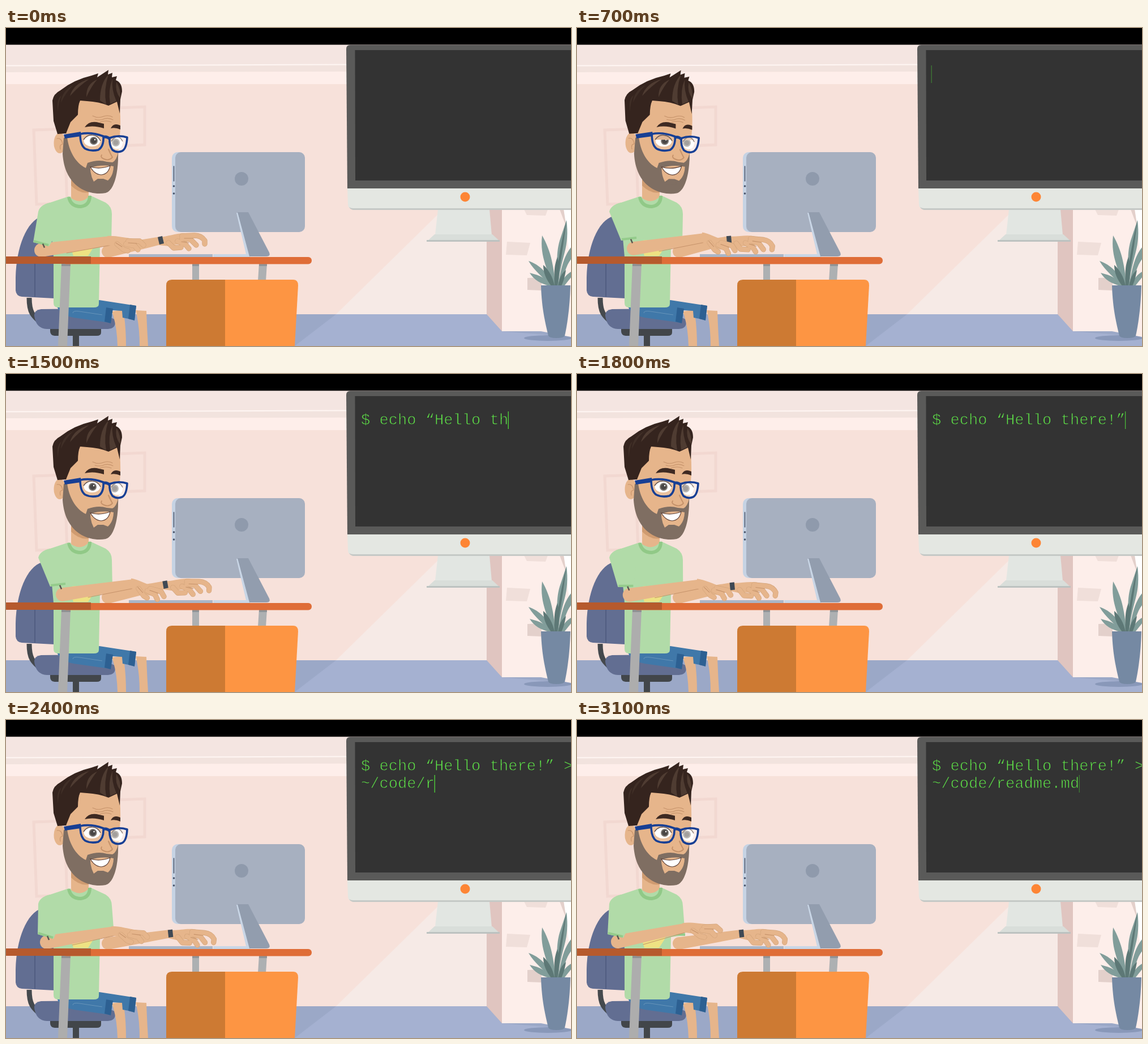
Recreate the animation shown at these times as an HTML page. Size 998 by 561 pixels, loop 3200 ms.

```html
<!DOCTYPE html>
<html lang="en">
<head>
<meta charset="utf-8">
<title>Typing at the desk</title>
<style>
  html, body { margin: 0; width: 100%; height: 100%; overflow: hidden; background: #000; }
  svg { display: block; width: 100vw; height: 100vh; }
  text { font: 27.1px "Liberation Mono", monospace; fill: #5fe348; stroke: #333; stroke-width: .8; white-space: pre; }
  .skin { fill: #e6b58b; }
  .crease { fill: none; stroke: #c6936b; stroke-width: 1.1; stroke-linecap: round; stroke-linejoin: round; }
  .finger { fill: none; stroke: #e6b58b; stroke-width: 8; stroke-linecap: round; stroke-linejoin: round; }
  .edge { stroke: #d3a47a; stroke-width: 9.4; }
  .shirt { fill: #b1dba8; }
  .hem { fill: none; stroke: #94cb8b; stroke-width: 4; }
  .chair { fill: #626e92; }
  .hair { fill: #35241e; }
  .strand { fill: #4f3c32; }
  .frame { fill: #fff; fill-opacity: .16; stroke: #173f94; stroke-width: 3.6; stroke-linejoin: round; }
</style>
</head>
<body>
<svg viewBox="0 0 998 561">
  <defs>
    <clipPath id="eyes"><ellipse cx="152" cy="199" rx="14.500" ry="10"/><ellipse cx="196" cy="203" rx="10" ry="10.500"/></clipPath>
  </defs>

  <g id="room">
    <path fill="#f7e1da" d="M0 29H998V561H0Z"/>
    <path fill="#f4e5e1" d="M0 29H998V64L0 66Z"/>
    <path fill="#f2e3de" d="M0 66L998 64V76L0 78Z"/>
    <path fill="none" stroke="#fff6f3" stroke-width="2" d="M0 66.500L610 64.500"/>
    <path fill="#feeeea" d="M0 78L998 76V99H0Z"/>
    <g fill="none" stroke="#f2d8d1" stroke-width="5">
      <path d="M49 180L103 178L108 309L54 311Z"/>
      <path d="M170 142L245 139V206L174 209Z"/>
    </g>
    <path fill="#9ba8c7" d="M0 505H998V561H0Z"/>
    <path fill="#f6eae6" d="M772 320H850V505H583Z"/>
    <path fill="#a5b1d1" d="M583 505H850L876 535L998 545V561H510Z"/>
    <path fill="#e0c5c0" d="M849 320H876V535L849 505Z"/>
    <path fill="#fdeeea" d="M876 320H998V545L945 535H876Z"/>
    <path fill="#fff" d="M985 320H998V420Z"/>
    <path fill="#e3d0cb" d="M978 320H985L990 352Z"/>
    <path fill="#f0dfda" d="M915 320H957L953 331L920 330ZM885 377L926 379L920 401L883 400Z"/>
    <path fill="#e3d0cb" d="M921 441L946 440V463L921 462Z"/>
    <ellipse cx="957" cy="547" rx="42" ry="5" fill="#8998b9"/>
    <g fill="#819d9a">
      <path d="M964 455C960 430 942 405 947 366C954 378 961 395 964 410C968 428 969 440 970 455Z"/>
      <path d="M970 455C976 425 970 402 978 375L990 339C993 362 991 380 987 395C982 415 977 430 976 455Z"/>
      <path d="M962 455C950 440 934 430 923 411C942 417 958 433 967 455Z"/>
      <path d="M975 455C980 428 984 404 998 387V408C989 419 985 438 980 455Z"/>
      <path d="M960 455C945 451 933 445 925 432C943 436 956 443 966 455Z"/>
      <path d="M978 455C984 441 991 434 998 430V440L986 455Z"/>
    </g>
    <path fill="#5d7876" d="M963 455C954 443 949 432 949 418C960 428 966 440 969 455ZM969 455C968 432 968 420 974 404C979 422 977 440 974 455ZM970 455C974 420 979 385 990 339C984 390 977 425 974 455ZM975 455C978 440 982 432 989 427C987 440 984 449 981 455Z"/>
    <path fill="#7589a3" d="M945 454H997C996 490 992 520 987 543Q985 547 972 547Q960 547 958 543C951 515 946 490 945 454Z"/>
  </g>

  <g id="terminal">
    <path fill="#e2e6e2" d="M763 320H854L858 365H758Z"/>
    <path fill="#d9deda" d="M757 364H859L872 376H744Z"/>
    <path fill="#bcc2c0" d="M743 374H872V377H743Z"/>
    <path fill="#5a5a59" d="M601 37Q601 30 608 30H998V284H603Z"/>
    <path fill="#333" d="M616.500 39H998V269H617Z"/>
    <path fill="#e4e7e2" d="M603 283H998V320H613Q604 319 604 311Z"/>
    <path fill="#c5c9c6" d="M606 316Q609 318 613 318H998V321H613Q608 320 606 316Z"/>
    <circle cx="811" cy="298" r="8.500" fill="#fd8535"/>
    <text id="line0" x="627" y="89" xml:space="preserve"></text>
    <text id="line1" x="627" y="120" xml:space="preserve"></text>
    <rect id="cursor" width="1.300" height="31" fill="#4fd83a"/>
  </g>

  <g id="computer">
    <rect x="293" y="219" width="60" height="141" rx="10" fill="#c6d3e4"/>
    <rect x="299" y="219" width="229" height="141" rx="10" fill="#a7b0c0"/>
    <path stroke="#48536a" stroke-width="1.600" stroke-linecap="round" d="M296.500 244V270"/>
    <circle cx="296.500" cy="279" r="1.800" fill="#48536a"/><circle cx="296.500" cy="292" r="1.800" fill="#48536a"/>
    <circle cx="416" cy="266" r="12" fill="#8f9aac"/>
    <path fill="#c9d6e6" d="M407 326H415L431 404H366V399H424Z"/>
    <path fill="#929dae" d="M409 325H428L465 396Q468 403 460 403H430Z"/>
    <path fill="#aab6c7" d="M217 399H365V404H217Z"/>
  </g>

  <g id="seat">
    <path class="chair" d="M64 332C36 340 18 388 17 440V463Q18 473 28 474L86 477V332Z"/>
    <path fill="none" stroke="#4c587c" stroke-width="1.500" d="M51 414V474"/>
    <path fill="none" stroke="#45494d" stroke-width="9" d="M41 476C41 503 48 508 62 520"/>
    <path fill="#42464a" d="M78 531H168V537Q168 543 160 543H86Q78 542 78 535ZM118 542H129V561H118Z"/>
    <path class="chair" d="M50 508Q49 498 62 496L150 495L192 514Q196 530 180 531H72Q53 530 50 508Z"/>
    <path class="skin" d="M187 500L207 497Q212 525 212 561H197Q196 525 187 500ZM229 498L248 499Q249 530 251 561H236Q236 525 229 498Z"/>
    <path fill="#4078a9" d="M90 491L165 480L230 490L227 515L206 511L205 499L187 498L184 520L120 511Q95 506 90 491Z"/>
    <path fill="#2d6092" d="M177 493L189 495L185 521L174 518ZM219 488L230 490L227 516L216 513Z"/>
    <path fill="none" stroke="#6795ba" d="M118 503Q118 498 130 500L170 506"/>
  </g>

  <g id="person">
    <path class="skin" d="M115 270H146V303Q130 313 115 304Z"/>
    <path fill="#cf9b70" d="M115 278Q130 293 146 290V280L115 266Z"/>
    <path id="torso" class="shirt"/>
    <path fill="none" stroke="#91c987" stroke-width="6" d="M111 298Q114 315 132 315Q148 313 148 296"/>
    <path id="print" fill="#eee283" d="M111 377Q125 370 134 379Q146 369 161 374L154 388L145 402H119Z"/>
    <path id="rightHem" class="hem"/>
    <path id="farArm" class="skin"/>
    <g id="farHand">
      <path class="skin" d="M-4 -6C15 -7 25 -13 42 -13Q54 -12 55 -5L43 6L28 7L16 10L-4 8Z"/>
      <path class="finger edge" d="M38 -8L60 -9Q72 -9 78 0V6M38 -4L53 -2L63 8M30 1L44 7L50 14M14 4L23 13L36 12"/>
      <path class="finger" d="M38 -8L60 -9Q72 -9 78 0V6M38 -4L53 -2L63 8M30 1L44 7L50 14M14 4L23 13L36 12"/>
      <path class="crease" d="M42 -4L57 -4M37 2L50 4"/>
      <path fill="#3f4954" d="M-5 -6L3 -8L6 5L-2 7Z"/>
    </g>
    <path id="nearArm" class="skin"/>
    <path id="nearLine" class="crease"/>
    <g id="nearHand">
      <path class="skin" d="M-7 -8C8 -9 22 -5 40 -3L46 7L32 13L16 12L-7 8Z"/>
      <path class="finger edge" d="M30 1L50 1L57 8M26 6L41 9L47 16M10 6L22 16L29 18"/>
      <path class="finger" d="M30 1L50 1L57 8M26 6L41 9L47 16M10 6L22 16L29 18"/>
      <path class="crease" d="M30 4L45 5M8 4L19 11"/>
    </g>
    <path id="sleeve" class="shirt"/>
    <path id="sleeveHem" class="hem"/>
    <path id="ink" stroke="#5a5650" stroke-width="2.500" d="M0 0L3 7"/>

    <g id="head">
      <ellipse class="skin" cx="95" cy="203" rx="10.500" ry="18"/>
      <path class="crease" d="M90 195Q98 193 100 205Q94 205 96 214"/>
      <path class="skin" d="M106 165L126 122H199Q204 160 201 190L197 239Q190 283 165 290Q120 283 104 225Z"/>
      <path fill="#7f6e62" d="M102 194L108 193C111 216 122 238 141 247L144 238Q163 231 178 236L188 237Q195 234 198 220C199 251 192 287 176 291C150 296 104 284 100 222Z"/>
      <path class="skin" d="M149 247Q167 240 190 244Q190 260 180 269L172 266H162L155 271Q149 260 149 247Z"/>
      <path fill="#7f6e62" d="M162 267H173L176 276H155Z"/>
      <path fill="#fff" stroke="#5f4137" stroke-width="1.200" d="M149 245Q166 250 184 243Q181 258 168 259Q156 258 149 245Z"/>
      <path class="crease" d="M153 155Q163 160 172 156Q181 153 188 157M157 161Q167 164 174 160Q182 158 189 162M166 166Q177 162 186 166"/>
      <path class="crease" style="stroke-width:2" d="M181 214Q185 223 188 228Q182 235 173 231Q166 228 169 224"/>
      <path fill="#3e2a22" d="M139 175Q146 164 160 166L173 169V177Q155 171 139 175ZM185 177Q190 166 202 172V179Q193 175 185 177Z"/>
      <g clip-path="url(#eyes)">
        <path fill="#fff" d="M130 180H215V220H130Z"/>
        <g id="pupils">
          <circle cx="153" cy="199" r="7" fill="#625c57"/><circle cx="153" cy="199" r="5" fill="#262321"/>
          <circle cx="192" cy="202" r="7" fill="#908a84"/><circle cx="192" cy="202" r="4.500" fill="#65605b"/>
          <circle cx="155" cy="197" r="1.200" fill="#fff"/>
        </g>
        <rect id="lids" x="130" y="175" width="85" height="24" fill="#d9a77e"/>
      </g>
      <path fill="none" stroke="#4b362c" stroke-width="1.500" d="M137 197Q143 188 152 189Q162 189 167 199M186 200Q191 192 197 192Q203 193 206 200"/>
      <path fill="#173f94" d="M102 188L132 183V191L104 195Z"/>
      <path class="frame" d="M131 187Q150 183 172 191Q173 209 163 215Q150 218 140 213Q131 207 131 187Z"/>
      <path class="frame" style="fill-opacity:.4" d="M183 194Q198 188 214 193Q213 213 205 217Q196 221 188 215Q182 207 183 194Z"/>
      <path fill="none" stroke="#173f94" stroke-width="5" d="M171 193Q177 190 184 196"/>
      <path class="hair" d="M91 187L84 164L82 128Q84 116 96 110Q120 91 151 84L163 80L161 87L181 74L180 82L188 79L187 87L196 85L194 92Q205 96 205 112L202 126L201 151L196 130L181 137Q164 130 143 129L131 128Q127 136 127 153L114 166L106 186Z"/>
      <path class="strand" d="M181 82Q166 98 166 128L177 135Q172 109 181 82ZM188 90Q180 109 184 134L195 129Q186 109 188 90ZM195 95Q192 112 202 124Q203 108 195 95ZM161 91Q141 99 142 122Q151 102 161 91ZM147 90Q119 98 113 120Q129 102 147 90Z"/>
      <path class="strand" opacity=".45" d="M119 101Q98 111 97 132Q106 113 119 101ZM98 119Q88 126 92 148Q92 132 98 119Z"/>
    </g>
  </g>

  <g id="desk">
    <path fill="#adb0b2" d="M329 415H341V446H329ZM447 415H461L459 446H445Z"/>
    <path fill="#909498" d="M329 415H341V420H329ZM447 415H461V420H447Z"/>
    <path fill="#cd7a33" d="M283 454Q283 444 293 444H388V561H283Z"/>
    <path fill="#fd9543" d="M387 444H507Q516 444 516 454L510 561H387Z"/>
    <path fill="#adadad" d="M98 415H114L108 561H92Z"/>
    <path fill="#8f9193" d="M98 415H114V420H98Z"/>
    <rect x="100" y="404" width="440" height="12.500" rx="6" fill="#df6d37"/>
    <path fill="#b65a2d" d="M0 403H150V416H0Z"/>
  </g>
  <path d="M0 0H998V29.500H0Z"/>
</svg>

<script>
const LOOP = 3200, STEP = 100, ADVANCE = 16.26;
const LINES = ['$ echo “Hello there!” >', '~/code/readme.md'];
const el = id => document.getElementById(id);
const put = (id, name, value) => el(id).setAttribute(name, value);
const clamp = (v, lo, hi) => Math.min(hi, Math.max(lo, v));

// elbow xy, wrist xy, near turn, near scale, far wrist xy, far turn, sleeve x, hem ys, right side x
const POSES = {
  rest:  [62, 392, 186, 375, 0, 1, 273, 375, 0, 48, 378, 385, 186],
  press: [100, 389, 226, 370, 15, 1, 268, 374, 8, 78, 375, 372, 186],
  reach: [100, 389, 226, 370, 15, 1, 281, 372, 3, 78, 375, 372, 188],
  wide:  [72, 392, 193, 372, 3, 1, 290, 377, 7, 56, 378, 386, 191],
  lift:  [72, 391, 194, 366, -3, 1.03, 290, 377, 7, 54, 378, 384, 191]
};
const MOVES = [
  [0, 'rest'], [200, 'lift'], [300, 'wide'], [600, 'press'], [1100, 'press'], [1200, 'reach'],
  [1300, 'press'], [1500, 'reach'], [1700, 'press'], [2000, 'wide'], [2200, 'lift'], [2400, 'wide'],
  [2500, 'lift'], [2700, 'wide'], [2900, 'lift'], [3000, 'wide'], [3100, 'lift'], [LOOP, 'rest']
].map(([t, name]) => [t, POSES[name]]);
const TILT = [[0, [0]], [500, [0]], [700, [.7]], [900, [0]], [LOOP, [0]]];
const BLINK = [[0, [0]], [500, [0]], [600, [1]], [800, [1]], [1000, [0]], [LOOP, [0]]];
const GAZE = [[0, [2]], [500, [2]], [900, [0]], [2300, [0]], [2600, [2]], [LOOP, [2]]];

function sample(track, t) {
  const i = track.findIndex(key => key[0] > t);
  const [t0, a] = track[i - 1], [t1, b] = track[i];
  const p = (t - t0) / (t1 - t0), ease = p * p * (3 - 2 * p);
  return a.map((v, k) => v + (b[k] - v) * ease);
}

function limb(x1, y1, w1, x2, y2, w2) {
  const length = Math.hypot(x2 - x1, y2 - y1);
  const nx = (y1 - y2) / length / 2, ny = (x2 - x1) / length / 2;
  return `M${x1 - nx * w1} ${y1 - ny * w1}L${x2 - nx * w2} ${y2 - ny * w2}` +
    `L${x2 + nx * w2} ${y2 + ny * w2}L${x1 + nx * w1} ${y1 + ny * w1}` +
    `A${w1 / 2} ${w1 / 2} 0 0 1 ${x1 - nx * w1} ${y1 - ny * w1}Z`;
}

function drawBody(t) {
  const [ex, ey, wx, wy, turn, size, fx, fy, farTurn, sx, sy, hemY, rx] = sample(MOVES, t);
  put('torso', 'd', `M111 297Q132 315 148 295L176 308Q187 315 187 328L${rx} 380L166 383L164 487Q164 493 155 493H92Q84 493 84 485V404L80 360L58 322Q63 311 78 308Z`);
  put('rightHem', 'd', `M167 377L${rx} 379`);
  put('farArm', 'd', limb(180, 394, 22, fx, fy, 14));
  put('farHand', 'transform', `translate(${fx} ${fy}) rotate(${farTurn})`);
  put('nearArm', 'd', limb(ex, ey, 24, wx, wy, 16));
  put('nearLine', 'd', `M${ex + 45} ${ey + 5}L${wx} ${wy + 8}`);
  put('nearHand', 'transform', `translate(${wx} ${wy}) rotate(${turn}) scale(${size})`);
  put('sleeve', 'd', `M78 308Q60 312 57 324L${sx} ${sy}L${sx + 28} ${hemY}L104 338Z`);
  put('sleeveHem', 'd', `M${sx + 1} ${sy - 2}L${sx + 27} ${hemY - 2}`);
  put('ink', 'transform', `translate(${sx + 17} ${(sy + hemY) / 2 - 1})`);

  put('head', 'transform', `rotate(${sample(TILT, t)} 135 290)`);
  put('pupils', 'transform', `translate(${sample(GAZE, t)} 0)`);
  put('lids', 'y', 165 + 8 * sample(BLINK, t)[0]);
}

function drawTerminal(t) {
  const typed = Math.floor(clamp((t - 1000) / 31.25, 0, 21) + clamp((t - 2050) / 32, 0, 18));
  const first = LINES[0].length, row = typed > first ? 1 : 0;
  el('line0').textContent = LINES[0].slice(0, typed);
  el('line1').textContent = LINES[1].slice(0, Math.max(0, typed - first));
  const typing = (t > 1000 && t < 1660) || (t > 2050 && t < 2630);
  const phase = (t + 50) % 400, glow = Math.min(phase, 400 - phase) / 200;
  put('cursor', 'x', 625.500 + ADVANCE * (row ? typed - first : typed) + (typed ? 1 : 0));
  put('cursor', 'y', 66 + 31 * row);
  put('cursor', 'opacity', t === 0 ? 0 : typing ? 1 : .25 + .75 * glow);
}

function render(now) {
  const t = Math.floor((now % LOOP) / STEP) * STEP;
  drawBody(t);
  drawTerminal(t);
}

let start;
function tick(now) {
  start ??= now;
  render(now - start);
  requestAnimationFrame(tick);
}
render(0);
requestAnimationFrame(tick);
</script>
</body>
</html>
```
